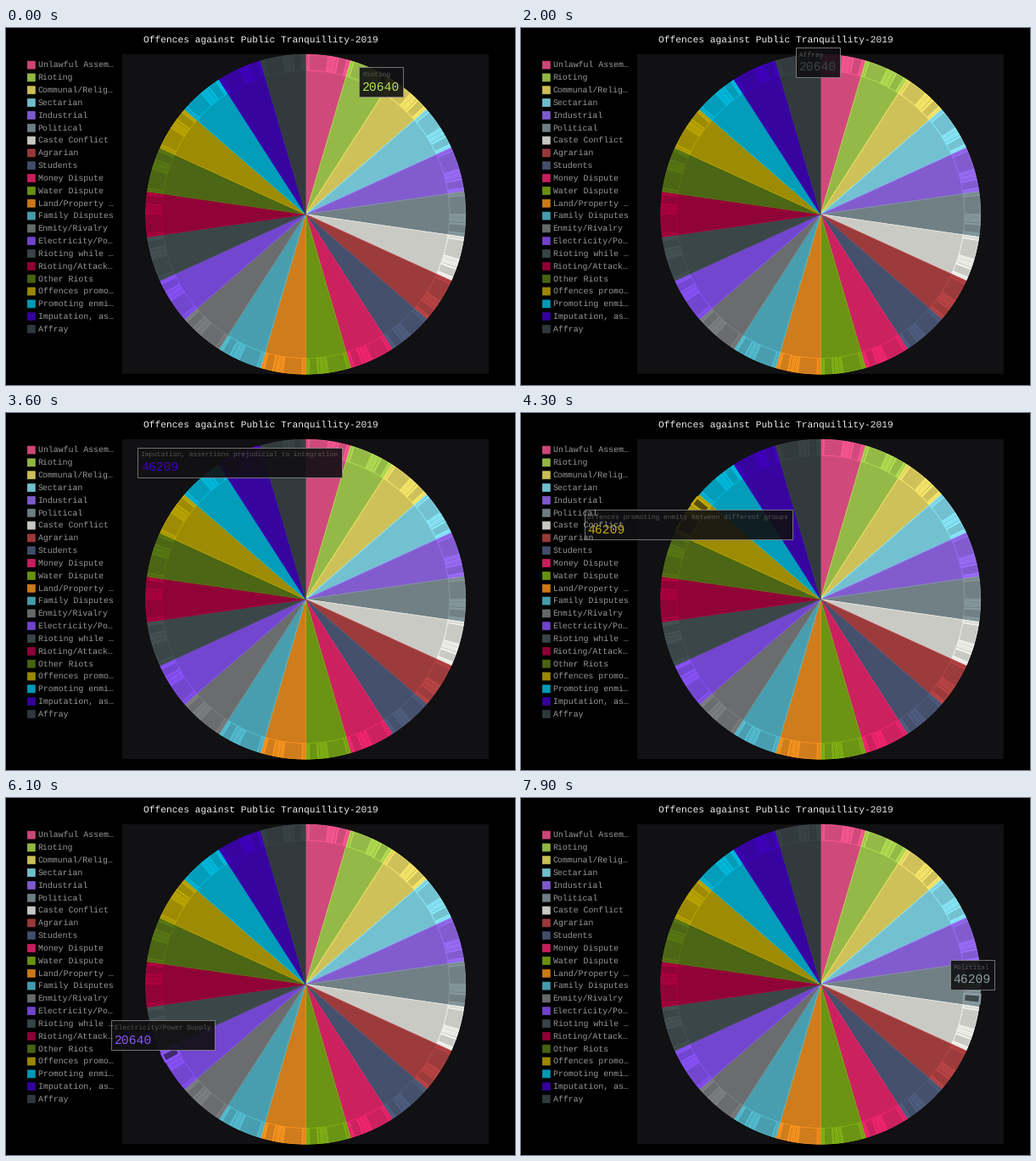
A matplotlib script that plays this animation: 600x421 px, repeating every 8000 ms.

```python
import colorsys

import matplotlib.pyplot as plt
from matplotlib.animation import FuncAnimation
from matplotlib.collections import PatchCollection
from matplotlib.colors import to_hex, to_rgb
from matplotlib.patches import Rectangle, Wedge
import numpy as np

W, H, DPI = 600, 421, 100
FRAMES, STEP = 80, 100
PX = 72 / DPI
CX, CY, R = 353.2, 219.7, 188.5
RING = 0.9 * R
PLOT_BG = "#111012"
MOVE = 200
NAME_SIZE, VALUE_SIZE = 7.9, 14.7
ADVANCE = 0.6

plt.rcParams["font.family"] = "Liberation Mono"
plt.rcParams["text.hinting"] = "none"

BASE = ("#ff5995 #b6e354 #feed6c #8cedff #9e6ffe #899ca1 #f8f8f2 #bf4646 "
        "#516083 #f92672 #82b414 #fd971f #56c2d6 #808384 #8c54fe #465457").split()

NAMES = [
    "Unlawful Assembly", "Rioting", "Communal/Religious", "Sectarian",
    "Industrial", "Political", "Caste Conflict", "Agrarian", "Students",
    "Money Dispute", "Water Dispute", "Land/Property Dispute",
    "Family Disputes", "Enmity/Rivalry", "Electricity/Power Supply",
    "Rioting while on Strike",
    "Rioting/Attacks on Police Personnel or Govt Servants", "Other Riots",
    "Offences promoting enmity between different groups",
    "Promoting enmity between groups",
    "Imputation, assertions prejudicial to integration", "Affray",
]
SPAN = 360 / len(NAMES)

# Borders of the small ring pieces, as fractions of one slice
CUTS = [0, .02, .06, .08, .50, .51, .535, .545, .57, .60, .61, .63, .655,
        .665, .705, .72, .731, .917, .925, .94, .965, .98, 1]

# part: (value, start, end, inner radius, outer radius)
PARTS = {
    "large": ("46209", .08, .50, RING, R),
    "mid": ("20640", .731, .917, RING, R),
    "small": ("4431", .665, .705, RING, R),
    "total": ("110681", 0, 1, 0, RING),
}

# (time, slice, hovered part)
HOVERS = [
    (-500, 1, "mid"), (400, 1, "large"), (700, 0, "mid"), (1500, 0, "large"),
    (1900, 21, "mid"), (2300, 21, "total"), (3300, 20, "mid"),
    (3500, 20, "large"), (3700, 19, "mid"), (3800, 19, "large"),
    (3900, 18, "mid"), (4100, 18, "large"), (4600, 17, "mid"),
    (4800, 17, "large"), (5100, 16, "mid"), (5300, 16, "small"),
    (5700, 16, "large"), (5900, 15, "mid"), (6000, 15, "large"),
    (6100, 14, "mid"), (6200, 14, "large"), (6300, 13, "mid"),
    (6400, 13, "large"), (6500, 12, "mid"), (6600, 12, "large"),
    (6900, 11, "large"), (7000, 10, "mid"), (7100, 9, "mid"),
    (7200, 8, "mid"), (7300, 8, "large"), (7400, 7, "large"),
    (7500, 6, "large"), (7600, 5, "mid"), (7700, 5, "large"),
]


def darken(color, amount=0.33):
    h, l, s = colorsys.rgb_to_hls(*to_rgb(color))
    return to_hex(colorsys.hls_to_rgb(h, max(0, l - amount), s))


def mix(color, back, alpha):
    return tuple(alpha * np.array(to_rgb(color)) + (1 - alpha) * np.array(to_rgb(back)))


def wedge(i, start, end, inner, outer, **style):
    a = -90 + SPAN * i
    width = outer - inner if inner else None
    return Wedge((CX, CY), outer, a + SPAN * start, a + SPAN * end,
                 width=width, **style)


def centre(i, part):
    _, start, end, inner, outer = PARTS[part]
    a = np.radians(SPAN * (i + (start + end) / 2))
    r = (inner + outer) / 2
    return np.array([CX + r * np.sin(a), CY - r * np.cos(a)])


def label(x, y, s, size, color, **kw):
    return ax.text(x, y, s, fontsize=size * PX, color=color, va="baseline", **kw)


def shorten(name):
    return name if len(name) <= 15 else name[:14] + "…"


COLORS = BASE + [darken(c) for c in BASE[:len(NAMES) - len(BASE)]]

fig = plt.figure(figsize=(W / DPI, H / DPI), dpi=DPI, facecolor="black")
ax = fig.add_axes([0, 0, 1, 1])
ax.set(xlim=(0, W), ylim=(H, 0))
ax.axis("off")

ax.add_patch(Rectangle((137, 31), 432, 377.2, fc=PLOT_BG, lw=0))
label(300.6, 17.6, "Offences against Public Tranquillity-2019", 11.32,
      "#eeeeee", ha="center")

pieces, fills, edges = [], [], []
for i, color in enumerate(COLORS):
    shapes = [wedge(i, a, b, RING, R) for a, b in zip(CUTS, CUTS[1:])]
    shapes.append(wedge(i, 0, 1, 0, RING))
    pieces += shapes
    fills += [mix(color, PLOT_BG, 0.8)] * len(shapes)
    edges += [color] * len(shapes)
ax.add_collection(PatchCollection(pieces, facecolors=fills, edgecolors=edges,
                                  linewidths=0.75 * PX, zorder=2))

for i, (name, color) in enumerate(zip(NAMES, COLORS)):
    y = 43.6 + 14.83 * i
    shade = mix(color, "black", 0.8)
    ax.add_patch(Rectangle((25.3, y - 4.5), 9, 9, fc=shade, ec=shade,
                           lw=0.75 * PX, snap=False, zorder=8))
    label(37.5, y + 2.8, shorten(name), 9.9, "#999999", zorder=8)

lit = []
box = ax.add_patch(Rectangle((0, 0), 1, 35, fc=(*to_rgb(PLOT_BG), 0.9),
                             ec="#8c8c8c", lw=0.8 * PX, zorder=5))
tip_name = label(0, 0, "", NAME_SIZE, "#555555", zorder=6)
tip_value = label(0, 0, "", VALUE_SIZE, "white", zorder=6)


def highlight(i, part):
    color = COLORS[i]
    patch = wedge(i, *PARTS[part][1:], fc=mix(color, PLOT_BG, 0.4), ec=color,
                  lw=2.6 * PX, zorder=3)
    lit.append(ax.add_patch(patch))


def tip_width(i, part):
    return 8 + ADVANCE * max(NAME_SIZE * len(NAMES[i]),
                             VALUE_SIZE * len(PARTS[part][0]))


def draw(frame):
    now = frame * STEP
    k = max(n for n, hover in enumerate(HOVERS) if hover[0] <= now)
    begin, i, part = HOVERS[k]
    _, old_i, old_part = HOVERS[max(k - 1, 0)]

    while lit:
        lit.pop().remove()
    if old_i == i and part != "total" and old_part != part:
        highlight(i, old_part)
    highlight(i, part)

    # The tooltip glides from the last hovered piece to the new one
    u = min(1, (now - begin) / MOVE)
    u = 1 - (1 - u) ** 2
    pos = (1 - u) * centre(old_i, old_part) + u * centre(i, part)
    width = tip_width(i, part)
    x, y = pos[0] - width / 2, pos[1] - 17.9
    box.set_xy((x, y))
    box.set_width(width)
    tip_name.set_text(NAMES[i])
    tip_name.set_position((x + 3.8, y + 10.8))
    tip_value.set_text(PARTS[part][0])
    tip_value.set_color(COLORS[i])
    tip_value.set_position((x + 3.8, y + 27.2))
    return [box, tip_name, tip_value, *lit]


anim = FuncAnimation(fig, draw, frames=FRAMES, interval=STEP, repeat=True,
                     repeat_delay=0, blit=False)
plt.show()
```
